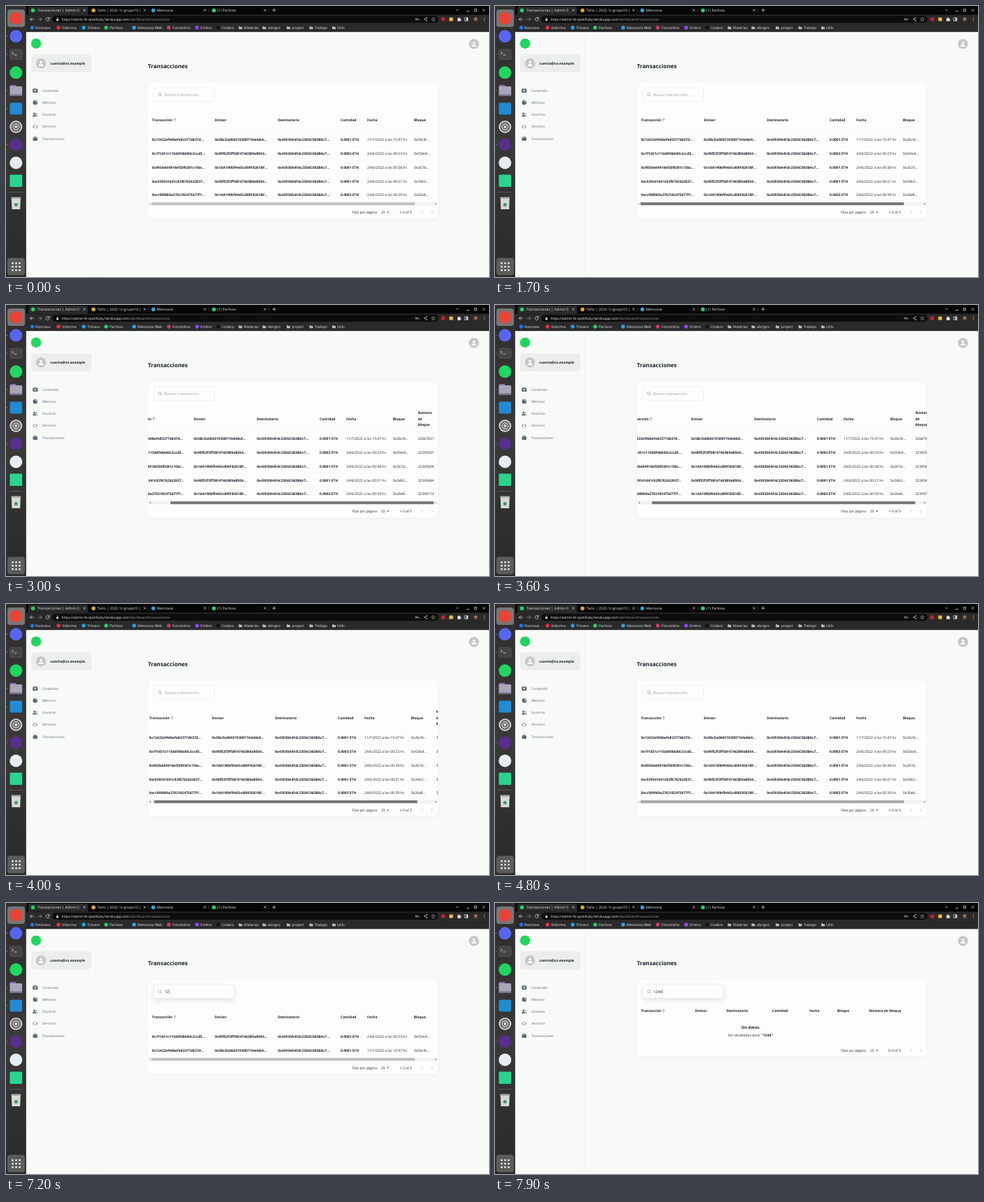
Recreate the animation shown at these times as an HTML page. Size 690 by 388 pixels, loop 8 s.

```html
<!DOCTYPE html>
<html lang="es">
<head>
<meta charset="utf-8">
<title>Transacciones</title>
<style>
  html, body { margin: 0; width: 100%; height: 100%; overflow: hidden; background: #f8faf7; }
  svg { display: block; width: 100vw; height: 100vh; }
  text { font-family: "Open Sans", "Noto Sans", sans-serif; text-rendering: geometricPrecision; white-space: pre; }
  .card { fill: #fdfefc; filter: drop-shadow(0 0 .6px rgba(145,158,155,.22)) drop-shadow(0 2px 3px rgba(145,158,155,.07)); }
  .field { fill: #fdfefc; stroke: #dde1e0; stroke-width: .5; }
  .field.focus { filter: drop-shadow(0 3px 4px rgba(145,158,155,.28)); }
  .line { fill: none; stroke-linecap: round; stroke-linejoin: round; }
</style>
</head>
<body>
<svg viewBox="0 0 690 388" preserveAspectRatio="none">
  <defs>
    <linearGradient id="dockFill" x2="0" y2="1">
      <stop stop-color="#302d2d"/><stop offset=".5" stop-color="#393937"/><stop offset="1" stop-color="#292928"/>
    </linearGradient>
    <clipPath id="tableClip"><rect x="203" y="140" width="414" height="160"/></clipPath>
  </defs>
  <rect width="690" height="388" fill="#f8faf7"/>
  <g id="browser"></g>
  <g id="dock"></g>
  <g id="page"></g>
  <g id="table"></g>
  <g id="search"></g>
</svg>
<script>
const INK = '#18202a', GREY = '#5c6976', SOFT = '#89939f', LIGHT = '#e8e8e8';
const $ = id => document.getElementById(id);

// y is the vertical middle of the line of text
const text = (x, y, s, { size = 5.05, weight = 400, fill = INK, anchor = 'start' } = {}) =>
  `<text x="${x}" y="${y + size * .36}" font-size="${size}" font-weight="${weight}" fill="${fill}" text-anchor="${anchor}">${s}</text>`;
const bold = (x, y, s, options) => text(x, y, s, { size: 4.95, weight: 700, ...options });
const rect = (x, y, w, h, fill, r = 0, more = '') =>
  `<rect x="${x}" y="${y}" width="${w}" height="${h}" rx="${r}" fill="${fill}" ${more}/>`;
const circle = (x, y, r, fill) => `<circle cx="${x}" cy="${y}" r="${r}" fill="${fill}"/>`;
const line = (d, stroke, width = .7) => `<path class="line" d="${d}" stroke="${stroke}" stroke-width="${width}"/>`;
const shape = (d, fill) => `<path d="${d}" fill="${fill}"/>`;
const cross = (x, y, r = 1.4) => line(`M${x - r} ${y - r}l${2 * r} ${2 * r}m0 ${-2 * r}l${-2 * r} ${2 * r}`, LIGHT, .6);
const folder = (x, y, s, fill) =>
  shape(`M${x - s} ${y - s * .8}h${s * .8}l${s * .3} ${s * .3}h${s * .9}v${s * 1.3}h${-2 * s}z`, fill);
const avatar = (x, y) => circle(x, y, 7.2, '#c3c7c9') + circle(x, y - 1.6, 1.8, '#fff') +
  shape(`M${x - 3.5} ${y + 3.8}v-.8c0-3 7-3 7 0v.8z`, '#fff');

function drawBrowser() {
  const tabs = [
    [38.5, 45, 112, '#1ed760', 'Transacciones | Admin-S'],
    [125, 130.5, 198, '#e0a63a', 'Tarlo | 2022-1c-grupo10 |'],
    [210.5, 215.5, 284, '#2aa3dc', 'Mensovia'],
    [297, 302, 370, '#25d366', '(1) Parlivox']
  ];
  const marks = [
    [37.5, 42, '#1877f2', 'Rostrava'], [75, 80, '#f03030', 'Vidorma'], [111, 116, '#1da1f2', 'Trinavo'],
    [143, 148, '#25d366', 'Parlivox'], [183, 188, '#2aa3dc', 'Mensovia Web'], [232.5, 238, '#d6347c', 'Fotumbria'],
    [273, 278, '#9146ff', 'Emitro'], [303, 308, '#141414', 'Codaro'], [335, 340, '', 'Materias'],
    [369, 374, '', 'abrigos'], [403.5, 408.5, '', 'project'], [436, 441, '', 'Trabajo'], [468.5, 473, '', 'Utils']
  ];
  let out = rect(28, 0, 662, 37.2, '#2a2a2a') + rect(28, 0, 662, 12.5, '#060606') +
    shape('M30 12.5q2 0 2-2V3q0-2 2-2h81q2 0 2 2v7.5q0 2 2 2z', '#2a2a2a') +
    rect(66, 14, 552, 10, '#0d0d0d', 5);
  for (const x of [203.5, 289.5, 375.5]) out += rect(x, 3.5, .5, 6, '#555');
  for (const [icon, x, close, color, name] of tabs)
    out += circle(icon, 6.2, 2.8, color) + text(x, 6, name, { size: 5.2, fill: LIGHT }) + cross(close, 6);
  for (const [icon, x, color, name] of marks)
    out += (color ? circle(icon, 31, 2.7, color) : folder(icon, 31.2, 2.5, '#b9b9b9')) +
      text(x, 31.2, name, { size: 5.2, fill: LIGHT });
  out += line('M380.8 6h4.4m-2.2-2.2v4.4', LIGHT) + line('M643.5 5.2l1.5 1.5 1.5-1.5', LIGHT) +
    line('M658 7.5h3.5', LIGHT) + line('M669.5 4.5h3v3h-3z', LIGHT) + cross(682.5, 6, 1.6) +
    line('M39.5 19h-5m2.2-2.2l-2.2 2.2 2.2 2.2', LIGHT) +
    line('M46 19h5m-2.2-2.2l2.2 2.2-2.2 2.2', '#999') +
    line('M61.5 17.5a2.4 2.4 0 1 0 .5 2M62 16.2v1.8h-1.8', LIGHT) +
    rect(71.9, 18.7, 3.2, 2.5, '#ccc', .4) + line('M72.6 18.7v-1a.9.9 0 0 1 1.8 0v1', '#ccc', .5) +
    text(79.5, 19, 'https://admin-fe-spotifiuby.herokuapp.com<tspan fill="#9a9a9a">/dashboard/transacciones</tspan>', { size: 4.8, fill: '#f0f0f0' }) +
    line('M587 19h3v1.2M587 19a1.1 1.1 0 1 1-2.2 0a1.1 1.1 0 1 1 2.2 0', '#ccc') +
    line('M601 17l-3 2 3 2', '#ccc') + circle(601, 17, .8, '#ccc') + circle(598, 19, .8, '#ccc') + circle(601, 21, .8, '#ccc') +
    line('M610.5 16.4l.8 1.8 1.9.2-1.4 1.3.4 1.9-1.7-1-1.7 1 .4-1.9-1.4-1.3 1.9-.2z', '#ccc', .5) +
    rect(622, 16.4, 5.2, 5.2, '#c81e3a', .5) + rect(633.3, 16.4, 5.2, 5.2, '#f2c522', .5) +
    shape('M645 17.5h1.3a.9.9 0 0 1 1.8 0h1.3v1.3a.9.9 0 0 1 0 1.8v1.2h-4.4z', LIGHT) +
    line('M655.5 16.8h4.2v4.4h-4.2z', LIGHT) + rect(657.6, 16.8, 2.1, 4.4, LIGHT) +
    circle(671, 19, 3, '#71543f') + circle(671, 18.2, 1.1, '#c9a58c');
  for (const y of [17, 19, 21]) out += circle(683.3, y, .6, LIGHT);
  $('browser').innerHTML = out;
}

function drawDock() {
  const logos = [
    [17.5, '#ea4335'], [43.3, '#5865f2'], [95.3, '#1ed760'], [198.5, '#55308d'], [224.5, '#e6eef3']
  ];
  let out = rect(0, 0, 28.8, 388, 'url(#dockFill)') + rect(2, 5, 25, 25, '#777', 4);
  for (const [y, color] of logos) out += circle(14.3, y, 9, color);
  out += rect(5.5, 62, 17.6, 14.5, '#454545', 2, 'stroke="#5e5e5e" stroke-width=".6"') +
    line('M8.5 66l2 1.5-2 1.5M12 70h3', '#ddd', .8) +
    rect(5.5, 113, 9, 5, '#8d6fb5', 1.5) + rect(5.5, 115, 17.6, 14, '#a9a6b8', 1.5) + rect(5.5, 126.5, 17.6, 2.5, '#77728d', 1) +
    rect(5.5, 138.5, 17.6, 17, '#218bd3', 2) +
    circle(14.3, 173, 9, '#c9c9c9') +
    '<circle cx="14.3" cy="173" r="5.9" fill="none" stroke="#4a4a4a" stroke-width="1.5"/>' +
    '<circle cx="14.3" cy="173" r="3" fill="none" stroke="#4a4a4a" stroke-width="1.2"/>' +
    rect(5.5, 241.5, 17.6, 17.6, '#27d58d', 1) + rect(4, 266, 21, .5, '#777') +
    shape('M7.8 275h13l-.6 16h-11.8z', '#d6d9d5') + rect(7.3, 273.5, 14, 2.6, '#a9ada8', 1) +
    circle(14.3, 284.5, 2.5, '#3d9c5b') + rect(2, 360.5, 25, 25, '#5c5c5a', 4);
  for (const y of [43.3, 69, 121, 147, 198.5]) out += circle(1.8, y, .8, '#7d78b8');
  for (let i = 0; i < 9; i++) out += rect(8.2 + i % 3 * 5, 367 + Math.floor(i / 3) * 5, 2.6, 2.6, '#f2f2f2', .8);
  $('dock').innerHTML = out;
}

function drawPage() {
  const nav = ['Contenido', 'Métricas', 'Usuarios', 'Servicios', 'Transacciones'];
  const icons = [
    rect(-3.5, -2.3, 7, 5.3, GREY, .8) + rect(-2.5, -3.3, 5, .6, GREY) + circle(0, .3, 1.2, '#e8ebee'),
    circle(0, 0, 3.2, GREY) + shape('M.4-.4v-3.3a3.3 3.3 0 0 1 3.3 3.3z', '#aeb7c0'),
    circle(-1, -1.5, 1.5, GREY) + circle(2, -1, 1.1, SOFT) + shape('M-3.8 2.8c0-3.5 5.6-3.5 5.6 0z', GREY) + shape('M2.3 2.8q0-1.7-.8-2.3 2.3-.2 2.3 2.3z', SOFT),
    line('M-1-2l-2.2 2 2.2 2M1-2l2.2 2-2.2 2', GREY, 1),
    rect(-3.2, -1.8, 6.4, 4.8, GREY, .8) + line('M-1.3-1.8v-1.2h2.6v1.2', GREY, .7)
  ];
  let out = rect(128.3, 37.2, .4, 351, '#e4e8e6') +
    circle(43, 53.7, 7.2, '#1ed760') + rect(36, 69.3, 86, 25.7, '#ebeeec', 4.3) + avatar(50, 82.2) +
    bold(63.3, 82.2, 'cuenta@co.example') + avatar(668.5, 54.3) + bold(202.7, 85.7, 'Transacciones', { size: 8.1 });
  nav.forEach((name, i) => {
    const y = 121 + i * 17.25;
    out += `<g transform="translate(41.7 ${y})">${icons[i]}</g>` + text(51.7, y, name, { size: 4.85, fill: GREY });
  });
  $('page').innerHTML = out;
}

const wallet = '0x43930A4Fdc23D6C063BAc7…';
const rows = [
  ['0x12422ef46befe82377d637d…', '0x5BcDa06831930EF744ebbA…', '0.0001', '11/7/2022 a las 15:47 hs', '0x26c9c…', '32667621'],
  ['0x1f1d31c115ddfd6600c2ccd5…', '0x90fE2f3ff58F47463B9aB504…', '0.0003', '24/6/2022 a las 00:23 hs', '0xf2dcd…', '32345501'],
  ['0x993b4d4918ef20f0381c15bc…', '0x1dA190bf94d3cd09F8261BF…', '0.0001', '24/6/2022 a las 00:38 hs', '0x267d…', '32345699'],
  ['0xc929341d41c82f6762622837…', '0x90fE2f3ff58F47463B9aB504…', '0.0001', '24/6/2022 a las 00:21 hs', '0x34b3…', '32345484'],
  ['0xccfd8969a2782182475677f1…', '0x1dA190bf94d3cd09F8261BF…', '0.0003', '24/6/2022 a las 00:39 hs', '0x26e8…', '32345714']
];
const heads = ['Transacción', 'Emisor', 'Destinatario', 'Cantidad', 'Fecha', 'Bloque'];
const wideCols = [208.5, 298.3, 388.3, 478, 516, 582.7];
const shortCols = [208.5, 286, 330.5, 396, 449, 489];
const sortArrow = y => line(`M241 ${y + 2}v-4m-1.7 1.7l1.7-1.7 1.7 1.7`, GREY, .55);
const rule = y => rect(203, y, 414, .35, '#eceeec');

function pagination(y, count) {
  return text(494.3, y, 'Filas por página', { size: 4.85 }) + text(536, y, '25', { size: 4.9 }) +
    shape(`M543.6 ${y - .8}h3.8l-1.9 2z`, GREY) +
    text(561.8, y, `${count ? 1 : 0}–${count} of ${count}`, { size: 4.9 }) +
    line(`M595.3 ${y - 1.9}l-1.9 1.9 1.9 1.9M607.7 ${y - 1.9}l1.9 1.9-1.9 1.9`, '#aab2ba');
}

function scrollbar(y, scroll, color) {
  const mid = y + 2.5;
  return rect(203, y, 414, 5, '#f1f2f0') + rect(208 + scroll * .9, y + .5, 376, 4, color) +
    shape(`M206.6 ${mid - 1.2}v2.4l-1.6-1.2z`, scroll ? '#505050' : '#a3a3a3') +
    shape(`M613.2 ${mid - 1.2}v2.4l1.6-1.2z`, scroll >= 30 ? '#a3a3a3' : '#505050');
}

function drawTable({ order, scroll, thumb, query }) {
  const count = order.length;
  const end = 181.6 + count * 19.75;
  const bottom = count ? end + 24.1 : 220.3;
  let out = rect(203, 110, 414, bottom - 110, '#fff', 5.7, 'class="card"');
  if (!count) {
    out += heads.map((name, i) => bold(shortCols[i], 154.5, name)).join('') + bold(534.3, 154.5, 'Número de bloque') +
      sortArrow(154.5) + rule(164.5) +
      bold(365.5, 178, 'Sin datos.', { size: 5.6, anchor: 'middle' }) +
      text(365.5, 189, `Sin resultados para  <tspan font-weight="700">"${query}"</tspan>.`, { anchor: 'middle' });
  } else {
    let cells = heads.map((name, i) => bold(wideCols[i], 163.2, name)).join('') + sortArrow(163.2) +
      ['Número', 'de', 'bloque'].map((word, i) => bold(618.4, 154.2 + i * 8.6, word)).join('');
    let rules = rule(181.4);
    order.forEach((index, i) => {
      const [hash, from, amount, date, block, number] = rows[index];
      const y = 191.5 + i * 19.75;
      cells += [hash, from, wallet, amount + ' ETH'].map((s, c) => bold(wideCols[c], y, s)).join('') +
        text(wideCols[4], y, date) + text(wideCols[5], y, block) + text(618.4, y, number);
      if (i < count - 1) rules += rule(y + 9.7);
    });
    out += `<g clip-path="url(#tableClip)">${rules}<g transform="translate(${-scroll})">${cells}</g></g>` +
      scrollbar(end + .3, scroll, thumb);
  }
  $('table').innerHTML = out + pagination(bottom - 9.2, count);
}

function drawSearch({ query, right, caret }) {
  const caretX = 226.2 + query.length * 3.15 + (query ? .4 : -.2);
  $('search').innerHTML =
    rect(211.3, 117, right - 211.3, 19.6, '#fff', 2.9, `class="field${right > 298 ? ' focus' : ''}"`) +
    `<circle cx="219.7" cy="126.5" r="2" fill="none" stroke="${SOFT}" stroke-width=".65"/>` + line('M221.2 128l1.6 1.6', SOFT) +
    text(226.2, 127, query || 'Buscar transacción…', { size: 5.5, fill: query ? INK : '#98a1aa' }) +
    (caret ? rect(caretX, 123.6, .4, 6.6, INK) : '');
}

// Each track lists [start ms, value]; values hold until the next entry
const tracks = {
  scroll: [[0, 0], [2400, 8], [2500, 21], [2600, 30], [3500, 24], [3600, 18], [3700, 13], [3800, 9], [3900, 6], [4000, 4], [4100, 2], [4200, 0]],
  thumb: [[0, '#c1c1c1'], [1300, '#a8a8a8'], [1700, '#787878'], [4800, '#a8a8a8'], [4900, '#c1c1c1']],
  right: [[0, 297.5], [5500, 312], [5600, 326]],
  caret: [[0, false], [5500, true], [6000, false], [6700, true]],
  query: [[0, ''], [6900, '1'], [7200, '12'], [7600, '124'], [7900, '1244']],
  order: [[0, [0, 1, 2, 3, 4]], [6900, [3, 1, 2, 4, 0]], [7200, [1, 0]], [7600, [0]], [7900, []]]
};
const valueAt = (track, t) => track.findLast(([start]) => start <= t)[1];

let shown = '';
const startTime = performance.now();
function frame() {
  const t = Math.max(0, performance.now() - startTime) % 8000;
  const state = Object.fromEntries(Object.entries(tracks).map(([name, track]) => [name, valueAt(track, t)]));
  const key = JSON.stringify(state);
  if (key !== shown) {
    shown = key;
    drawTable(state);
    drawSearch(state);
  }
  requestAnimationFrame(frame);
}

drawBrowser();
drawDock();
drawPage();
frame();
</script>
</body>
</html>
```
